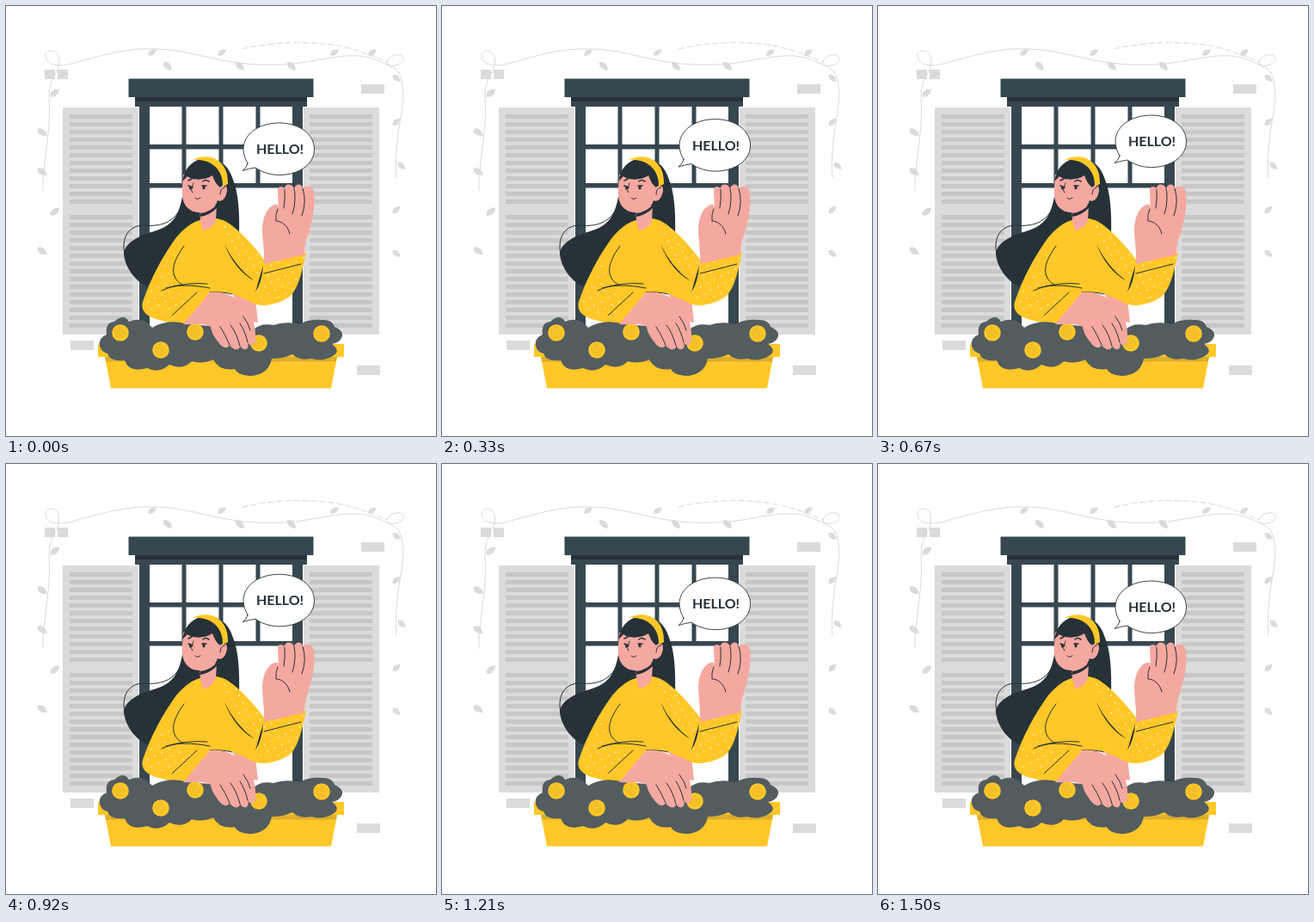
An HTML page for the animation above (1540 ms loop, 500 by 500 pixels).

```html
<!DOCTYPE html>
<html lang="en">
<head>
<meta charset="utf-8">
<title>Hello from the window</title>
<style>
  html, body { margin: 0; width: 100%; height: 100%; overflow: hidden; background: #fff; }
  svg { display: block; width: 100%; height: 100%; }
  .line { fill: none; stroke: #263238; stroke-width: 1; stroke-linecap: round; stroke-linejoin: round; }
  .dark { fill: #263238; }
  .frame { fill: #37474f; }
  .skin { fill: #f5a8a0; }
  .yellow { fill: #ffc727; }
  .shade { fill: #dcae2b; }
  .grey { fill: #dbdbdb; }
  .vine { fill: none; stroke: #d6d6d6; stroke-width: .9; }
  text { font: 700 16px Lato, sans-serif; text-anchor: middle; }
</style>
</head>
<body>
<svg viewBox="0 0 500 500">
  <defs>
    <pattern id="dots" width="13" height="13" patternUnits="userSpaceOnUse" patternTransform="rotate(18)">
      <circle cx="3" cy="3" r=".85" fill="#fff"/>
      <circle cx="9.5" cy="9.5" r=".85" fill="#fff"/>
    </pattern>
  </defs>

  <g class="vine">
    <path d="M43 215C42 195 48 165 50 135C52 110 47 100 54 85C61 74 65 61 58 54C51 49 43 54 47 62C51 70 66 71 80 66C110 58 140 48 175 50C215 51 240 65 290 68C350 71 375 56 410 58C425 59 435 65 445 69C454 71 464 66 462 60C458 54 446 57 443 64C441 70 453 71 457 78C464 92 462 115 458 135C455 155 452 180 454 200"/>
    <path stroke-dasharray="7 3" d="M275 50C315 40 365 41 395 48C415 53 430 60 444 65"/>
  </g>
  <g id="leaves" class="grey"></g>

  <path class="grey" d="M45 74h12v11h-12zM60 74h12v11h-12zM413 91h27v11h-27zM75 389h27v11h-27zM408 418h27v11h-27zM66 118h88v264h-88zM346 118h88v264h-88z"/>
  <path id="slats" fill="#c7c7c7"/>

  <path class="frame" d="M142.500 84.500h215v21.500h-215zM150 106h200v11h-200z"/>
  <path class="dark" d="M150 106h200v5h-200z"/>
  <path id="panes" class="frame"/>

  <g id="bubble">
    <path class="line" style="fill:#fff;stroke-width:.9" d="M281 183C278 178 276 172 276 166.500C276 149 294 136 317.500 136S358.500 149 358.500 166.500S341 196.500 317.500 196.500C307 196.500 297 193 290 188Q282 189 275 191.500Q280 188 281 183Z"/>
    <text class="dark" x="318.500" y="172">HELLO!</text>
  </g>

  <!-- hair and torso -->
  <path class="dark" d="M206 199C210 186 219 178 232 177C248 177 259 185 264 202C270 216 272 240 271 268L228 270L164 326C150 320 138 303 137 288C139 274 155 267 175 261C194 255 201 243 205 222Z"/>
  <path class="line" d="M140 296C132 274 140 255 160 255C181 257 194 251 202 237"/>
  <path class="skin" d="M262 332L290 341L293 368L280 366Z"/>
  <path class="yellow" d="M229 248C215 251 206 260 198 269C182 291 168 317 159 344C156 355 165 362 178 365C188 368 197 370 206 371L237 333L262 334L291 347C305 350 320 345 331 337C341 326 344 308 349 287L300 295C290 281 276 266 266 258C258 251 252 248 244 247Z"/>
  <path fill="url(#dots)" d="M186 298L194 322L184 330L222 333L196 366L162 357L161 344ZM247 250L267 260L300 296L349 288L342 320L328 337L294 345L288 318L258 280Z"/>
  <path class="skin" d="M225 232L245 232L244 249C242 257 234 261 229 261L226 250Z"/>
  <path class="line" d="M207 279C198 291 193 303 195 311C197 319 201 322 207 325M181 331C196 323 215 324 237 328M186 328Q211 321 234 323M193 360L222 333"/>
  <path class="dark" d="M254 277Q267 304 289 320Q266 307 254 277ZM290 333Q294 318 299 302Q298 320 290 333Z"/>
  <path class="line" d="M300 311L343 300M237 333Q251 332 263 335"/>

  <!-- head -->
  <path class="skin" d="M206 196L244 190L250 210C255 204 259 212 256 219C254 226 249 228 246 226C243 236 235 240 225 240C212 240 203 230 205 211Z"/>
  <path class="dark" d="M226 241Q240 239 246 229L245 235Q237 243 226 245ZM205 204C208 189 217 180 229 178C247 179 255 193 255 212Q253 205 249 211C245 208 242 203 240 197C232 203 216 203 211 198Z"/>
  <path class="yellow" d="M217 179C234 170 259 177 258 207L252 210C253 192 240 177 217 179Z"/>
  <path class="line" d="M249 219Q249 212 254 211M218 206C217 211 214 214 217 217M220 223Q222 226 226 223"/>
  <path class="line" style="stroke-width:1.600" d="M212 203L216 201M229 204Q232 201 236 204M212 209L217 211M228 209L233 209"/>
  <ellipse class="dark" cx="214.500" cy="211.500" rx="1.500" ry="2.300"/>
  <ellipse class="dark" cx="230" cy="211" rx="1.700" ry="2.400"/>

  <!-- waving hand -->
  <path class="skin" d="M300 300C301 287 298 270 298 258C299 245 303 235 312 231C316 229 317 233 317 236L316 214C316 209 322 209 324 213C324 206 332 206 335 212C337 206 344 206 345 212C350 207 357 210 358 217C360 232 356 250 352 264C348 275 347 281 347 289Z"/>
  <path class="line" d="M324 213Q325 224 323 235M335 212Q338 226 333 242M345 212Q350 228 344 244M316 236Q313 243 314 250C321 250 328 256 330 265"/>

  <!-- planter -->
  <path class="yellow" d="M107 393h286v15h-286zM115 408H385L378 444.500H122Z"/>
  <path class="shade" d="M115 408H385L384 413.500H116Z"/>
  <path fill="#535c5f" d="M109 395Q107 386 117 382Q115 368 126 367Q137 357 143 367Q159 360 170 374Q188 363 212 370L288 376Q297 368 311 371Q325 366 341 370Q352 364 367 365Q379 364 382 373Q392 377 391 384Q388 392 379 393Q390 401 380 407Q368 414 355 410Q342 413 333 405Q323 410 309 410Q306 427 287 430Q270 430 266 422Q248 425 241 411Q228 417 216 413Q206 424 190 417Q178 428 164 421Q143 427 138 412Q121 414 118 404Q110 402 109 395Z"/>
  <g id="flowers"></g>

  <!-- resting hand -->
  <path class="skin" d="M206 370L237 333C254 331 268 338 280 350C288 361 291 377 290 390C288 396 283 395 281 391C284 400 276 402 272 395C272 401 264 401 260 394C257 400 251 397 247 391C243 386 239 380 238 373C230 368 218 371 206 370Z"/>
  <path class="line" d="M281 391Q278 378 272 369M272 395Q268 380 261 371M260 394Q255 382 249 373M276 361Q282 369 284 377"/>
</svg>
<script>
const $ = id => document.getElementById(id);
const times = (n, make) => Array.from({ length: n }, (_, i) => make(i)).join('');
const rect = (x, y, w, h) => `M${x} ${y}h${w}v${h}h${-w}z`;

// Leaves sway around both side vines and sit above or below the top one.
const leaf = (x, y, angle, size) =>
  `<path transform="translate(${x} ${y}) rotate(${angle}) scale(${size})" d="M-.5 0Q-.1-.55.5 0Q-.1.5-.5 0Z"/>`;
const sway = i => Math.cos(i * Math.PI * 2 / 3);
$('leaves').innerHTML =
  times(5, i => leaf(47 + 10 * sway(i), 101 + 46 * i, 10 - 50 * sway(i), 14)) +
  times(5, i => leaf(456 + 4 * sway(i + 1), 84 + 51 * i, i % 2 ? -40 : 40, 12)) +
  [170, 251, 382, 426].map(x => leaf(x, 54, -35, 12)).join('') +
  [188, 272, 332].map(x => leaf(x, 70, 45, 14)).join('');

// One slat is left out at the middle rail.
$('slats').setAttribute('d', times(28, i =>
  i === 12 ? '' : rect(74, 126 + 9 * i, 73, 5) + rect(353, 126 + 9 * i, 73, 5)));

$('panes').setAttribute('d',
  rect(155, 117, 12, 256) + rect(333, 117, 12, 256) +
  times(3, i => rect(204.5 + 43 * i, 117, 5, 92)) +
  times(2, i => rect(167, 161 + 45 * i, 166, 5.5)));

const spiral = 'M0 0' + times(40, i => {
  const a = i * .45, r = a * .4;
  return `L${r * Math.cos(a)} ${r * Math.sin(a)}`;
});
$('flowers').innerHTML = [[133, 380], [180, 400], [220, 379], [294, 392], [367, 381]].map(([x, y]) =>
  `<g transform="translate(${x} ${y})"><circle class="yellow" r="9.800"/>
   <path fill="none" stroke="#dcae2b" stroke-width=".8" d="${spiral}"/></g>`).join('');

// The bubble rises and falls at a steady pace, then rests briefly.
const loop = 1540, travel = 1500, rise = 10;
function draw() {
  const t = Math.min(performance.now() % loop, travel) / travel;
  const lift = rise * (1 - Math.abs(2 * t - 1));
  $('bubble').setAttribute('transform', `translate(0 ${-lift})`);
  requestAnimationFrame(draw);
}
draw();
</script>
</body>
</html>
```
